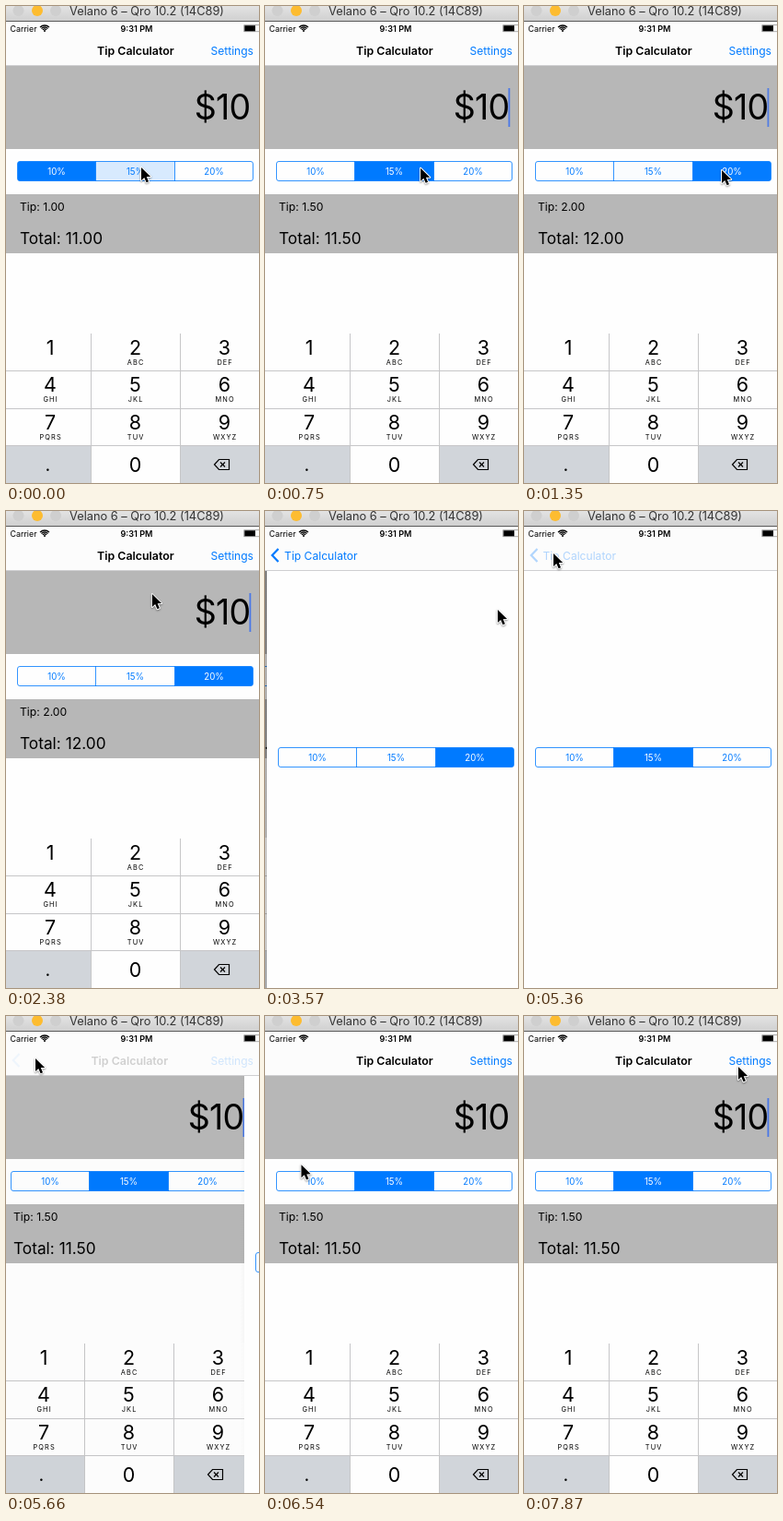
Animation of 275 by 517 pixels, one loop 8000 ms. Source, as an HTML page with a canvas:

```html
<!DOCTYPE html>
<html lang="en">
<head>
<meta charset="utf-8">
<title>Tip Calculator</title>
<style>
  html, body { margin: 0; width: 100%; height: 100%; overflow: hidden; background: #fff; }
  canvas { display: block; }
</style>
</head>
<body>
<canvas id="stage" width="275" height="517"></canvas>
<script>
const ctx = document.getElementById('stage').getContext('2d');
const LOOP = 8000, STEP = 148.6;
const SCREEN = 281, PARALLAX = 84;
const BLUE = '#007aff', GRAY = '#b7b7b7', WHITE = '#fefefe', HAIR = '#c6c6c8';
const PUSH = 3272, POP = 5472;

// Pointer path: time, x, y
const POINTER = [
  [0, 147, 175], [600, 147, 175], [1040, 215, 177], [1340, 215, 178], [1490, 215, 178],
  [1930, 57, 174], [2100, 57, 174], [2378, 159, 90], [2970, 240, 47], [3272, 240, 47],
  [3566, 253, 107], [4310, 120, 268], [4900, 120, 268], [5300, 32, 46], [5800, 32, 46],
  [6690, 41, 185], [6836, 42, 186], [7430, 42, 186], [7876, 233, 55]
];
// Taps on the segmented controls: press, release, segment
const MAIN_TAPS = [[-100, 50, 1], [1150, 1190, 2]];
const SETTINGS_TAPS = [[4400, 4480, 1]];

const clamp = v => Math.max(0, Math.min(1, v));
const mix = (a, b, k) => a + (b - a) * k;

function rect(x, y, w, h, color) {
  ctx.fillStyle = color;
  ctx.fillRect(x, y, w, h);
}

function text(str, x, y, size, { color = '#000', align = 'left', weight = 400, spacing = 0 } = {}) {
  ctx.font = `${weight} ${size}px Inter, sans-serif`;
  ctx.letterSpacing = spacing + 'px';
  ctx.textAlign = align;
  ctx.fillStyle = color;
  ctx.fillText(str, x, y);
}

function line(points, color, width) {
  ctx.beginPath();
  points.forEach(([x, y]) => ctx.lineTo(x, y));
  ctx.strokeStyle = color;
  ctx.lineWidth = width;
  ctx.stroke();
}

function dot(x, y, r, color) {
  ctx.beginPath();
  ctx.arc(x, y, r, 0, 7);
  ctx.fillStyle = color;
  ctx.fill();
}

function withAlpha(alpha, draw) {
  if (alpha <= 0) return;
  ctx.save();
  ctx.globalAlpha = alpha;
  draw();
  ctx.restore();
}

function shifted(x, draw) {
  ctx.save();
  ctx.translate(Math.round(x), 0);
  draw();
  ctx.restore();
}

// Share of the distance left in a critically damped slide
function remaining(ms) {
  const s = Math.max(0, ms) * 0.024;
  return (1 + s) * Math.exp(-s);
}

function pointerAt(t) {
  const i = POINTER.findIndex(p => p[0] > t);
  if (i < 0) return POINTER.at(-1).slice(1);
  const [t0, x0, y0] = POINTER[i - 1], [t1, x1, y1] = POINTER[i];
  const k = (t - t0) / (t1 - t0);
  return [mix(x0, x1, k), mix(y0, y1, k)];
}

function segmentLevels(t, selected, taps) {
  let levels = [0, 1, 2].map(i => +(i === selected));
  for (const [press, release, target] of taps) {
    if (t < press) break;
    const k = clamp((t - release) / 150);
    levels = levels.map((v, i) => i === target ? mix(0.15, 1, k) : mix(v, 0, k));
  }
  return levels;
}

function segments(y, levels) {
  const edges = [12.5, 97.5, 183.5, 268.5];
  ctx.save();
  ctx.beginPath();
  ctx.roundRect(12.5, y + 0.5, 256, 21, 2.5);
  ctx.fillStyle = WHITE;
  ctx.fill();
  ctx.save();
  ctx.clip();
  levels.forEach((v, i) => withAlpha(v, () => rect(edges[i], y, edges[i + 1] - edges[i], 22, BLUE)));
  ctx.restore();
  ctx.strokeStyle = BLUE;
  ctx.lineWidth = 0.8;
  ctx.stroke();
  for (const x of edges.slice(1, 3)) line([[x, y], [x, y + 22]], BLUE, 0.8);
  levels.forEach((v, i) => text(['10%', '15%', '20%'][i], (edges[i] + edges[i + 1]) / 2, y + 14.5, 9.7,
    { align: 'center', color: v > 0.5 ? '#fff' : BLUE }));
  ctx.restore();
}

function keypad() {
  const edges = [0, 92.5, 189.5, SCREEN], centers = [48, 140.5, 237.5], top = 355, pitch = 40.6;
  const letters = ['', 'ABC', 'DEF', 'GHI', 'JKL', 'MNO', 'PQRS', 'TUV', 'WXYZ'];
  rect(0, 354, SCREEN, 163, WHITE);
  rect(0, 477, 92, 40, '#d1d5da');
  rect(190, 477, SCREEN - 190, 40, '#d1d5da');
  for (const x of edges.slice(1, 3)) line([[x, top], [x, 517]], HAIR, 1);
  for (const y of [395.5, 436.5, 476.5]) line([[0, y], [SCREEN, y]], HAIR, 1);
  letters.forEach((word, i) => {
    const x = centers[i % 3], y = top + Math.floor(i / 3) * pitch;
    text(i + 1, x, y + 22.7, 21.5, { align: 'center' });
    text(word, x + 0.6, y + 33.8, 7.4, { align: 'center', spacing: 1.1 });
  });
  text('0', centers[1], 504.5, 21.5, { align: 'center' });
  text('.', 45.5, 503.5, 20, { align: 'center' });
  line([[226.5, 497], [231.5, 491.5], [242.5, 491.5], [242.5, 502.5], [231.5, 502.5], [226.5, 497], [227, 496.5]], '#000', 1.2);
  line([[233, 494.5], [238, 499.5]], '#000', 1.2);
  line([[238, 494.5], [233, 499.5]], '#000', 1.2);
}

function caretAlpha(t) {
  const phase = (t - (t < POP ? 200 : 580) + LOOP) % 1000;
  return phase < 550 ? clamp(phase / 150) : 1 - clamp((phase - 550) / 150);
}

function mainView(t) {
  const returned = t >= POP;
  const tip = returned || t < 1190 ? (t < 50 ? 1 : 1.5) : 2;
  rect(0, 65, SCREEN, 452, WHITE);
  rect(0, 65, SCREEN, 90, GRAY);
  rect(0, 204, SCREEN, 64, GRAY);
  text('$10', 265.3, 123.2, 37.5, { align: 'right', spacing: -0.8 });
  withAlpha(returned && t < 6000 ? 1 : caretAlpha(t), () => rect(264.5, 89, 1.8, 42, '#4a78e8'));
  segments(168, returned ? [0, 1, 0] : segmentLevels(t, 0, MAIN_TAPS));
  text('Tip: ' + tip.toFixed(2), 15, 222.3, 12.2);
  text('Total: ' + (10 + tip).toFixed(2), 15, 258, 17.3);
  keypad();
}

function settingsView(t, away) {
  const shade = ctx.createLinearGradient(-5, 0, 0, 0);
  shade.addColorStop(0, 'rgba(0,0,0,0)');
  shade.addColorStop(1, 'rgba(0,0,0,.16)');
  // The keyboard takes less of the shadow than the page above it
  withAlpha(away, () => {
    rect(-5, 65, 5, 452, shade);
    rect(-5, 65, 5, 289, shade);
  });
  rect(0, 65, SCREEN, 452, WHITE);
  segments(256, segmentLevels(t, 2, SETTINGS_TAPS));
}

function navBar(t, away) {
  const pushed = t >= PUSH && t < POP;
  const homeAlpha = pushed ? 1 - clamp((t - PUSH) / 220) : t >= POP ? clamp((t - POP - 100) / 420) : 1;
  const backAlpha = pushed ? clamp((t - PUSH) / 250) : t >= POP ? 1 - clamp((t - POP) / 185) : 0;
  const settingsHeld = t > 2950 && t < PUSH, backHeld = t > 5330 && t < POP;
  rect(0, 17, SCREEN, 47, '#fcfcfc');
  rect(0, 64, SCREEN, 1, '#cfcfd1');
  withAlpha(homeAlpha, () => {
    text('Tip Calculator', 140.8 - away * PARALLAX, 52.5, 12.4, { align: 'center', weight: 600 });
  });
  withAlpha(homeAlpha * (settingsHeld ? 0.3 : 1), () => {
    text('Settings', 269, 52.5, 12.1, { align: 'right', color: BLUE });
  });
  withAlpha(backAlpha * (backHeld ? 0.3 : 1), () => {
    line([[14.5, 41], [7.8, 48], [14.5, 55]], BLUE, 2.2);
    if (t < POP || away > 0.5) text('Tip Calculator', 20.5 + (1 - away) * PARALLAX, 52.5, 12.1, { color: BLUE });
  });
}

function statusBar() {
  text('Carrier', 4.5, 27.5, 8.9);
  for (const r of [3, 5, 7]) {
    ctx.beginPath();
    ctx.arc(42, 28, r, -Math.PI * 0.75, -Math.PI * 0.25);
    ctx.strokeStyle = '#000';
    ctx.lineWidth = 1.3;
    ctx.stroke();
  }
  dot(42, 27, 1, '#000');
  text('9:31 PM', 142, 27.5, 9.1, { align: 'center', weight: 600 });
  ctx.strokeStyle = '#777';
  ctx.lineWidth = 0.6;
  ctx.strokeRect(258.8, 20.7, 18, 7.1);
  rect(259.3, 21.2, 11.7, 6.1, '#000');
}

function titleBar() {
  const metal = ctx.createLinearGradient(0, 0, 0, 16);
  metal.addColorStop(0, '#e3e3e3');
  metal.addColorStop(1, '#d0d0d0');
  rect(0, 0, 275, 16, metal);
  rect(0, 16, 275, 1, '#5a5a5a');
  dot(13.5, 5, 6, '#cfcfcf');
  dot(34, 5, 6, '#fdbc30');
  dot(54, 5, 6, '#cfcfcf');
  text('Velano 6 – Qro 10.2 (14C89)', 69, 10.3, 12.8, { color: '#333' });
}

function pointer(x, y) {
  ctx.save();
  ctx.beginPath();
  for (const [dx, dy] of [[0, 0], [0, 14], [3.3, 11], [5.6, 16.2], [8, 15.2], [5.8, 10.1], [10.2, 10]])
    ctx.lineTo(x + dx, y + dy);
  ctx.closePath();
  ctx.lineJoin = 'round';
  ctx.strokeStyle = '#fff';
  ctx.lineWidth = 2;
  ctx.shadowColor = 'rgba(0,0,0,.4)';
  ctx.shadowBlur = 2;
  ctx.shadowOffsetY = 1;
  ctx.stroke();
  ctx.shadowColor = 'transparent';
  ctx.fillStyle = '#000';
  ctx.fill();
  ctx.restore();
}

function draw(t) {
  // 0 = calculator, 1 = settings
  const away = t < PUSH ? 0 : t < POP ? 1 - remaining(t - PUSH) : remaining(t - POP);
  rect(0, 0, 275, 517, WHITE);
  if (away < 0.999) {
    shifted(-away * PARALLAX, () => mainView(t));
    withAlpha(away * 0.1, () => rect(0, 65, 275, 452, '#000'));
  }
  if (away > 0.001) shifted((1 - away) * SCREEN, () => settingsView(t, away));
  navBar(t, away);
  statusBar();
  titleBar();
  pointer(...pointerAt(t));
}

function tick() {
  const t = performance.now() % LOOP;
  draw(Math.floor((t + 10) / STEP) * STEP);
  requestAnimationFrame(tick);
}
tick();
</script>
</body>
</html>
```
